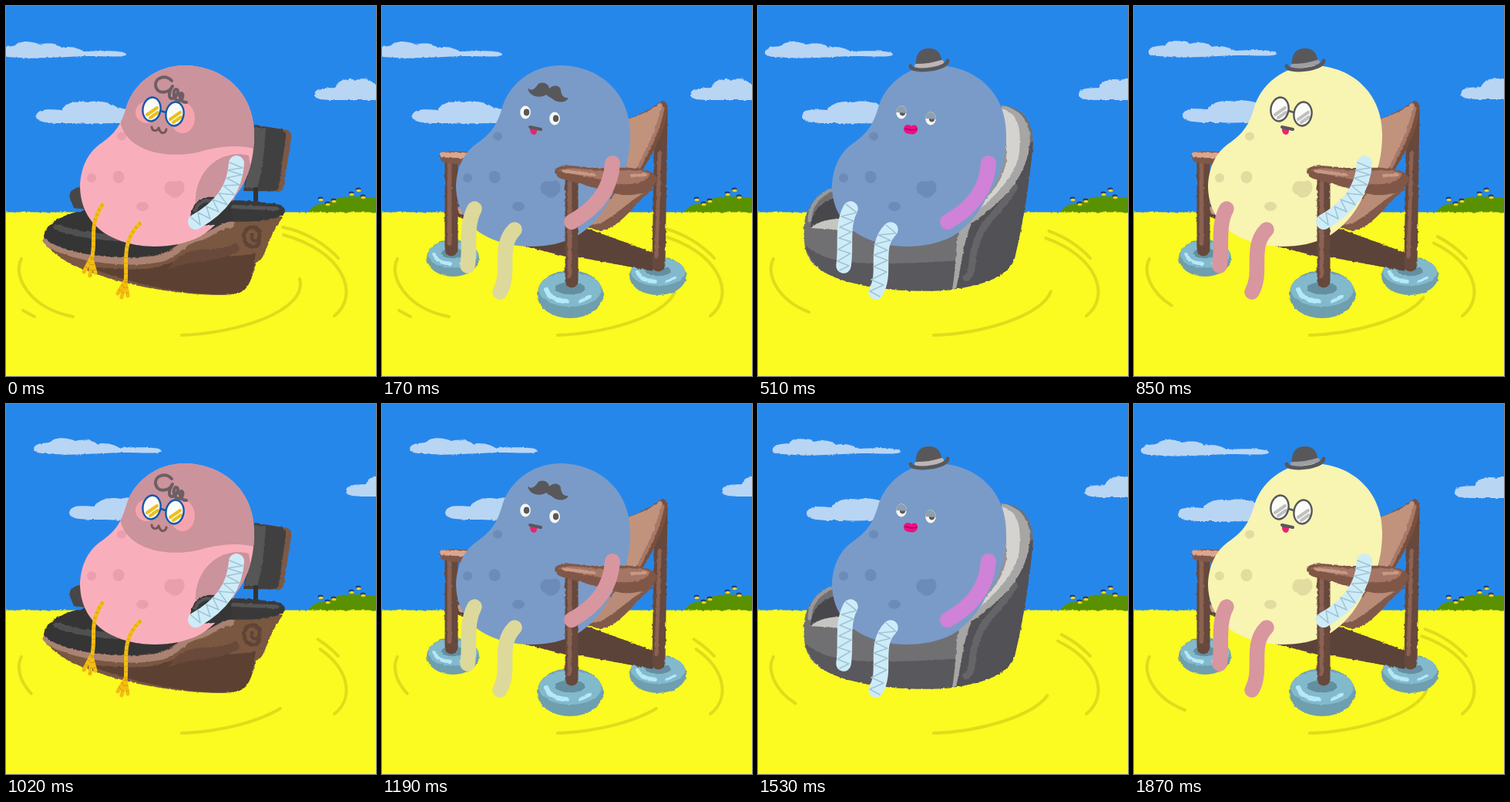
An HTML page for the animation above (2040 ms loop, 480 by 480 pixels).

```html
<!DOCTYPE html>
<html>
<head>
<meta charset="utf-8">
<style>
html, body { margin: 0; width: 100%; height: 100%; overflow: hidden; background: #2687eb; }
svg { display: block; width: 100vw; height: 100vh; }
</style>
</head>
<body>
<svg id="stage" viewBox="0 0 480 480" fill="none" stroke-linecap="round" stroke-linejoin="round"></svg>
<script>
const STEP = 170;
const GREY = '#58585b';
const fill = (d, color) => `<path d="${d}" fill="${color}"/>`;
const line = (d, color, w, more = '') => `<path d="${d}" stroke="${color}" stroke-width="${w}" ${more}/>`;
const oval = (x, y, rx, ry, color, more = '') =>
  `<ellipse cx="${x}" cy="${y}" rx="${rx}" ry="${ry}" fill="${color}" ${more}/>`;
const rough = s => `<g filter="url(#rough)">${s}</g>`;

const BODY = 'M232 77C284 78 322 114 322 166C322 200 314 226 297 247C287 270 270 288 252 299C234 308 214 312 192 312' +
  'C142 311 97 288 96 234C97 208 107 190 122 179C143 165 149 153 155 135C163 102 194 77 232 77Z';

const defs = `<defs>
  <filter id="rough" filterUnits="userSpaceOnUse" x="-60" y="0" width="620" height="480" color-interpolation-filters="sRGB">
    <feTurbulence type="fractalNoise" baseFrequency=".2" numOctaves="2" seed="4"/>
    <feComponentTransfer result="noise"><feFuncA type="linear" slope="0" intercept="1"/></feComponentTransfer>
    <feDisplacementMap in="SourceGraphic" in2="noise" scale="3" xChannelSelector="R" yChannelSelector="G"/>
  </filter>
  <clipPath id="inside"><path d="${BODY}"/></clipPath>
</defs>`;

// Scenery
const clouds = [
  { d: 'M-10 59C-6 51 4 54 12 51C18 45 32 45 44 50C56 47 68 49 72 54C84 51 97 56 101 59C120 58 156 57 156 63C154 67 130 65 105 65C70 66 40 69 18 67C5 66-12 67-10 59Z', x: [0, 19, 29, 46], y: [0, 0, -1, -2] },
  { d: 'M39 143C40 132 58 134 72 135C77 125 93 122 106 125C120 121 138 126 143 131L156 134V152C130 152 100 153 82 152C65 152 39 153 39 143Z', x: [0, 18, 24, 43], y: [0, 0, -1, -2] },
  { d: 'M400 115C401 105 415 107 426 106C430 96 442 93 455 96C466 91 477 97 482 105L530 110V122C490 122 470 122 440 122C420 122 400 123 400 115Z', x: [0, 16, 24, 41], y: [0, 0, -1, -2] }
];
const ripples = [
  ['M20 328C8 350 30 392 87 403', [100, 81, 64, 46]],
  ['M228 427C298 425 392 396 381 354', [100, 91, 86, 72]],
  ['M426 402C460 375 438 318 360 297', [100, 91, 80, 66]],
  ['M431 327C415 310 390 293 359 287', [100, 77, 56, 41]],
  ['M22 395L37 403', [100, 0, 0, 0]]
];
const bees = [[408, 251], [417, 257], [425, 253], [448, 244], [457, 239], [463, 248]];

const land = rough(
  fill('M391 269C397 258 408 256 420 254C433 246 452 245 466 248L490 250V270Z', '#5a9100') +
  fill('M-10 267.5H490V490H-10Z', '#fbfa21')) +
  bees.map(([x, y]) =>
    oval(x, y - 1.5, 3.4, 2, '#1d3f78') + oval(x + .5, y + .5, 3, 1.7, '#f5d21c')).join('');

const scene = n => rough(clouds.map(c =>
    `<g transform="translate(${c.x[n]} ${c.y[n]})">${fill(c.d, '#b9d5f4')}</g>`).join('')) +
  land + ripples.map(([d, len]) => len[n] ?
    line(d, '#dfdc1b', 4, `pathLength="100" stroke-dasharray="${len[n]} 300"`) : '').join('');

// Chairs: [behind the body, in front of it]
const float = (x, y, rx, ry) =>
  oval(x, y, rx, ry, '#6f9eae') + oval(x, y - ry * .2, rx * .95, ry * .72, '#83b9cc') +
  oval(x, y - ry * .25, rx * .45, ry * .26, '#648fa0') +
  line(`M${x - rx * .72} ${y - ry * .2}Q${x - rx * .6} ${y + ry * .25} ${x - rx * .1} ${y + ry * .3}`, '#b5e9f8', ry * .2) +
  line(`M${x + rx * .3} ${y + ry * .3}L${x + rx * .6} ${y + ry * .1}`, '#b5e9f8', ry * .14);
const post = (x, top, end, w) =>
  line(`M${x} ${top}V${end}`, '#67483c', w) +
  line(`M${x - w * .15} ${top + 4}V${end - 8}`, '#8b6253', w * .34);

const chairs = {
  lounge: [rough(
    fill('M322 154L366 161Q371 163 370 172L360 236Q359 241 350 241L308 240Z', '#7a5947') +
    fill('M322 154L358 160Q364 162 363 170L354 234Q353 240 346 240L308 240Z', '#414041') +
    fill('M322 158L337 158C335 190 333 212 326 236H310Z', '#575656') +
    line('M324 238V252', '#343334', 6) +
    fill('M83 250C80 238 92 233 104 235L120 266L88 262Z', '#484748') +
    fill('M48 303C60 325 90 340 130 352C180 368 240 375 282 375C308 374 318 365 324 333C338 330 336 305 359 274L250 268L60 290Z', '#795741') +
    fill('M104 338C165 342 195 347 228 325C260 318 290 330 324 320C320 350 317 371 298 373C250 377 180 367 104 338Z', '#5c4132') +
    fill('M216 333C238 307 265 323 300 307L303 318C270 335 245 327 210 342Z', '#69493a') +
    line('M329 306C325 317 309 313 309 299C309 283 330 283 329 298C328 309 318 306 319 297', '#5f4436', 5) +
    line('M52 304C70 324 150 338 203 327C225 320 230 304 250 300C265 298 268 286 292 283', '#aa8272', 9) +
    fill('M49 300C50 282 75 268 110 264L250 270L292 279C268 286 262 297 240 299C218 310 210 322 190 324C140 330 70 322 49 300Z', '#353536') +
    line('M66 287C100 300 160 303 215 305', '#505051', 8) +
    fill('M250 256C280 248 335 254 356 258Q366 264 359 272C335 282 290 281 250 277Z', '#39393a') +
    line('M288 260L352 263', '#555556', 5)),
  rough(
    fill('M239 278C239 256 253 246 270 248L294 250L292 277C275 283 258 290 239 278Z', '#363637') +
    line('M245 265C250 254 257 251 268 253', '#555556', 4))],

  deck: [rough(
    float(92, 327, 34, 24) + float(358, 350, 37, 25) +
    fill('M96 256L175 288L262 287L352 320V344L255 326L238 325L175 309L96 272Z', '#5b4339') +
    line('M97 263L110 270', '#c99785', 8) +
    fill('M240 295L318 226L353 238C330 250 315 285 284 292L262 286Z', '#80594a') +
    fill('M262 284L318 228L346 238C325 250 305 270 282 283Z', '#b98c77') +
    line('M362 136L359 336', '#67483c', 17) + line('M360 190L356 325', '#8d6252', 5) +
    fill('M363 123Q372 123 370 138C366 168 348 195 334 220L305 226L314 148C334 142 350 133 363 123Z', '#78503f') +
    fill('M361 126Q367 128 361 143C352 170 338 195 326 220L305 222L314 148C334 143 350 134 361 126Z', '#c1937d') +
    line('M364 133C358 164 342 194 331 213', '#a87867', 5)  +
    post(90, 200, 316, 17) +
    fill('M74 194C75 186 100 189 124 190L112 208L78 202Z', '#805848') +
    line('M79 193L112 194', '#d9a692', 7)),
  rough(
    float(244, 374, 43, 31) + post(246, 225, 357, 17) +
    fill('M224 214C226 206 245 206 270 210C310 211 345 205 356 222C358 239 334 247 311 245C285 240 255 229 236 225C228 223 224 219 224 214Z', '#805747') +
    fill('M229 214C235 209 252 210 270 213C305 215 338 210 348 218C343 231 320 233 304 230C280 223 248 219 229 214Z', '#a57665') +
    line('M236 214L275 219', '#c89985', 4) + line('M324 220L342 219', '#c89985', 4))],

  tub: [rough(
    fill('M316 129C342 130 357 148 357 176C352 235 342 290 333 327C327 346 300 361 252 368C195 373 135 366 100 352C72 341 60 325 60 302C57 268 70 245 100 234L300 190Z', '#707073') +
    fill('M350 180C338 230 285 255 266 302L256 367C305 360 327 346 333 327C342 290 352 235 357 176Z', '#515156') +
    fill('M62 310C85 338 160 337 260 330L254 368C195 373 135 366 100 352C78 342 65 330 62 310Z', '#58585d') +
    line('M333 235C319 263 293 274 282 311C275 333 281 346 270 353', '#656467', 9) +
    fill('M316 129C340 132 353 150 353 174C350 219 323 250 277 282C265 310 264 340 257 366L252 368C258 335 255 304 264 283L300 240L322 180Z', '#a7a6a5') +
    fill('M316 133C338 139 342 160 339 189C335 223 302 253 265 282L300 240L322 180Z', '#d4d3cf') +
    fill('M319 173L323 190C323 217 309 239 282 263L300 220Z', '#959491') +
    line('M67 278C67 257 80 245 98 237', '#98989a', 5) +
    fill('M68 287C69 266 82 254 100 249L115 283Z', '#48484c') +
    fill('M68 288C82 276 106 274 125 277L145 293Z', '#c6c5c2')), '']
};

// Body parts
const skins = { pink: ['#f9afbb', '#eb9fae'], blue: ['#7a9bc8', '#6c8bb9'], cream: ['#f8f4b1', '#e2dca1'] };
const body = ([skin, spot]) => fill(BODY, skin) +
  oval(150, 169, 6, 5.5, spot) + oval(111, 223, 6, 6, spot) + oval(146, 222, 7.5, 8, spot) +
  oval(177, 260, 8, 6, spot) +
  fill('M207 231C212 224 219 230 225 226C232 228 233 236 230 241C224 251 215 250 212 245C205 243 204 237 207 231Z', spot);
const plumage = `<g clip-path="url(#inside)">` +
  fill('M140 70H330V188C305 177 270 183 248 190C210 198 160 190 149 154Z', '#cb939c') +
  fill('M315 194C275 184 242 218 246 260L280 280L320 230Z', '#cb939c') + '</g>' +
  oval(183, 138, 15, 14, '#f5a4ae') + oval(229, 145, 16, 20, '#f5a4ae');

const glasses = (rim, tint) => [[189, 134], [219, 140]].map(([x, y]) =>
  oval(x, y, 11.5, 15.5, '#fbfbf8', `transform="rotate(9 ${x} ${y})"`) +
  line(`M${x - 6} ${y + 7}L${x + 7} ${y - 2}M${x - 2} ${y + 11}L${x + 8} ${y + 4}`, tint, 4) +
  oval(x, y, 11.5, 15.5, 'none', `stroke="${rim}" stroke-width="2.4" transform="rotate(9 ${x} ${y})"`)).join('') +
  line('M201 136L207 138', rim, 2.4);
const eyes = lid => [[186, 138], [224, 146]].map(([x, y]) =>
  oval(x, y, 6.8, 8.4, '#f8f8f2') + oval(x + 1.5, y, 3.7, 4.4, GREY) +
  (lid ? fill(`M${x - 7} ${y}C${x - 6} ${y - 11} ${x + 6} ${y - 11} ${x + 7} ${y + 1}Z`, '#8f9fae') : '')).join('');

const faces = {
  blueSpecs: glasses('#1259ae', '#ebc01c'),
  greySpecs: glasses(GREY, '#c0c0bf'),
  open: eyes(false),
  sleepy: eyes(true)
};
const mouths = {
  beak: line('M189 157C190 163 196 163 198 158C201 168 207 165 208 160', '#76555b', 3),
  tongue: fill('M192 158L201 160C202 170 191 169 192 158Z', '#e52670') + line('M192 157L206 160', GREY, 4),
  lips: fill('M189 159C190 153 196 153 199 156C203 153 208 155 207 161C205 167 200 167 197 166C193 166 189 164 189 159Z', '#f00e83') +
    line('M191 159Q199 162 206 160', '#a70762', 1.5)
};
const hat = band => fill('M205 80C203 63 210 55 221 55C234 55 238 62 239 76Z', GREY) +
  line('M206 78Q222 78 238 73', band, 6) + line('M198 78C199 87 245 83 246 71', GREY, 5);
const tops = {
  curl: line('M215 97C207 88 193 93 194 103C196 116 212 113 216 104C211 111 210 121 216 120C222 118 226 108 220 108C216 110 217 123 225 123C230 121 231 113 227 113C224 116 226 125 234 125', '#6d5e63', 4),
  brow: fill('M189 106C193 112 199 107 202 102C207 97 216 100 217 107C223 101 232 103 232 110C233 117 237 120 242 119C239 126 227 126 222 121C218 118 216 118 213 115C206 120 191 119 189 106Z', GREY),
  bowler: hat('#beb6b5'),
  greyBowler: hat('#9d9da3')
};

const ARM = 'M299 204C297 240 276 263 246 280';
const LEGS = 'M120 263C108 285 115 312 111 337M172 290C149 313 168 345 153 371';
const wrap = '#a0c4d5', gauze = '#ceecf8';
const armOf = color => color ? line(ARM, color, 20) : line(ARM, gauze, 20) +
  line('M290 203L307 210L287 213L306 219L286 223L303 232L282 233L297 245L276 243L287 258L268 251L276 267L260 260L265 276L249 268L252 284L240 274', wrap, 1.6);
const legsOf = color => color ? line(LEGS, color, 19.5) : line(LEGS, gauze, 19.5) +
  line('M114 257L128 268L108 273L124 279L106 287L121 293L105 301L121 306L104 316L120 321L103 331L118 337L106 343', wrap, 1.6) +
  line('M166 284L179 295L156 297L172 304L151 309L168 317L150 323L168 330L150 338L167 345L147 355L163 362L145 370L158 377', wrap, 1.6);
const BIRD = 'M125 258C106 285 118 306 111 328M174 282C148 306 158 335 155 358';
const TOES = 'M111 326L101 345M111 328L109 350M111 328L116 346M155 356L145 373M155 358L150 378M155 358L158 376';
const birdLegs = line(BIRD + TOES, '#f3bd12', 5) +
  line(BIRD + TOES, '#d69b0c', 4, 'stroke-dasharray="1 6" stroke-linecap="butt"');

const rose = '#d8969f';
const look = (chair, skin, face, mouth, top, arm, legs, bird) =>
  chairs[chair][0] + body(skins[skin]) + (bird ? plumage : '') + faces[face] + mouths[mouth] + tops[top] +
  chairs[chair][1] + (bird ? birdLegs : legsOf(legs)) + armOf(arm);
const looks = [
  look('lounge', 'pink', 'blueSpecs', 'beak', 'curl', '', '', true),
  look('deck', 'blue', 'open', 'tongue', 'brow', rose, '#ddd99b'),
  look('lounge', 'cream', 'open', 'lips', 'bowler', rose, '#ddd99b'),
  look('tub', 'blue', 'sleepy', 'lips', 'bowler', '#cf82d7', ''),
  look('tub', 'pink', 'blueSpecs', 'beak', 'curl', '', '', true),
  look('deck', 'cream', 'greySpecs', 'tongue', 'greyBowler', '', rose)
];

const stage = document.getElementById('stage');
const group = s => `<g display="none">${s}</g>`;
stage.innerHTML = defs + '<g id="scenes">' + [0, 1, 2, 3].map(n => group(scene(n))).join('') +
  '</g><g id="looks">' + looks.map(group).join('') + '</g>';
const show = (id, n) => [...document.getElementById(id).children].forEach((g, i) =>
  g.setAttribute('display', i === n ? 'inline' : 'none'));

let start, last = -1;
function draw(now) {
  start ??= now;
  const tick = Math.max(0, Math.floor((now - start) / STEP)) % 12;
  if (tick !== last) {
    const pair = tick >> 1;
    show('scenes', Math.min(pair, 6 - pair)); // drifts out, then back
    show('looks', tick % 6);
    last = tick;
  }
  requestAnimationFrame(draw);
}
draw(performance.now());
</script>
</body>
</html>
```
